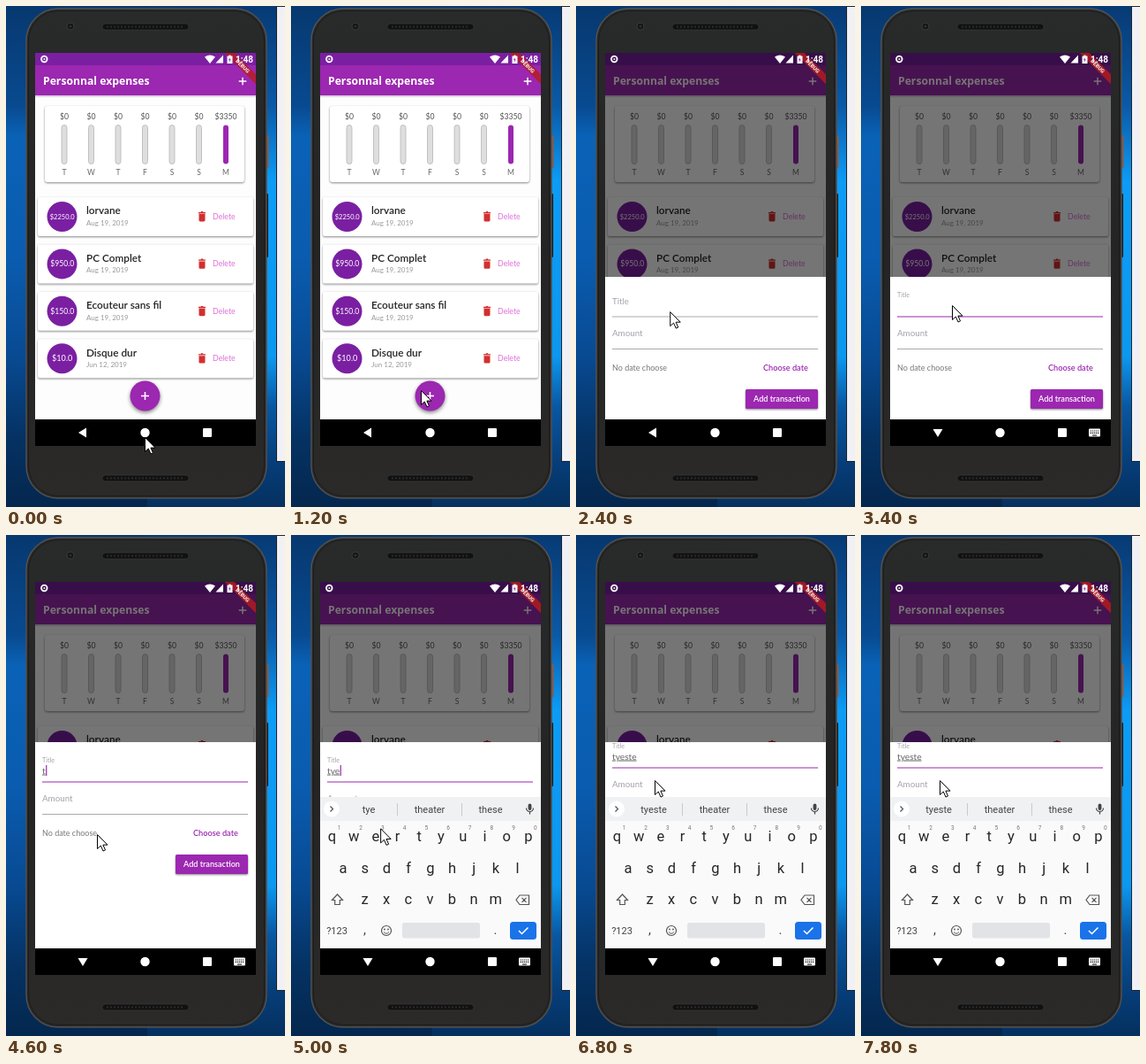
Animation, 316 px wide and 566 px high, one loop 8000 ms. Source, as an HTML page:

```html
<!DOCTYPE html>
<html lang="en">
<head>
<meta charset="utf-8">
<title>Expenses app</title>
<style>
html, body { margin: 0; width: 100%; height: 100%; overflow: hidden; }
svg { display: block; width: 316px; height: 566px; font-family: Lato, sans-serif; }
.mid { text-anchor: middle; }
.semi { font-weight: 600; }
.bold { font-weight: 700; }
.sys { font-family: Roboto, sans-serif; }
.bar { font: 700 12.2px "Open Sans", sans-serif; }
.card { fill: #fff; filter: drop-shadow(0 1.2px 1.3px #0007); }
</style>
</head>
<body>
<svg id="stage" viewBox="0 0 316 566"></svg>
<script>
const PURPLE = '#9c27b0', DARK = '#7b1fa2', HINT = '#a5a0aa';

const text = (x, y, size, str, fill, cls = '', extra = '') =>
  `<text x="${x}" y="${y}" font-size="${size}" fill="${fill}" class="${cls}" ${extra}>${str}</text>`;
const rect = (x, y, w, h, fill, r = 0, extra = '') =>
  `<rect x="${x}" y="${y}" width="${w}" height="${h}" rx="${r}" fill="${fill}" ${extra}/>`;
const circle = (x, y, r, fill, extra = '') =>
  `<circle cx="${x}" cy="${y}" r="${r}" fill="${fill}" ${extra}/>`;
const path = (d, fill, extra = '') => `<path d="${d}" fill="${fill}" ${extra}/>`;
const line = (d, stroke, width = 1, extra = '') =>
  path(d, 'none', `stroke="${stroke}" stroke-width="${width}" ${extra}`);
const group = (id, body, extra = '') => `<g id="${id}" ${extra}>${body}</g>`;
const gradient = (id, stops) => `<linearGradient id="${id}" x2="0" y2="1">` +
  stops.map(([at, c]) => `<stop offset="${at}" stop-color="${c}"/>`).join('') + '</linearGradient>';

const defs = `<defs>
  ${gradient('left', [[0, '#07386f'], [.2, '#084a90'], [.26, '#0a62b6'], [.5, '#0a5cb0'], [.7, '#084a92'], [.86, '#053263'], [1, '#04274e']])}
  ${gradient('right', [[0, '#073a74'], [.2, '#0a5aa8'], [.35, '#0c9cf6'], [.7, '#0c98f0'], [.8, '#0857a2'], [.92, '#063c76'], [1, '#05305f']])}
  ${gradient('body', [[0, '#292a2a'], [.5, '#242424'], [1, '#2b2a29']])}
  <clipPath id="screen">${rect(33, 53, 250, 414, '#fff')}</clipPath>
</defs>`;

const wallpaper = rect(0, 0, 160, 566, 'url(#left)') + rect(160, 0, 156, 566, 'url(#right)') +
  rect(306.5, .5, 20, 514, '#f1f0f5', 0, 'stroke="#1d2733"');

const speaker = y => rect(109, y, 98, 7, '#111', 3.5, 'stroke="#3a3a3a" stroke-width=".7"') +
  line(`M114 ${y + 3.5}H202`, '#2b2b2b', 2, 'stroke-dasharray="2 2"');

const phone = rect(294, 146, 3.5, 37, '#8a5b4a', 1) + rect(294, 212, 3, 72, '#1a1a1a', 1) +
  rect(23, 3, 272, 553, 'url(#body)', 36, 'stroke="#55524f" stroke-width="1.4"') +
  rect(25.5, 5.5, 267, 548, 'none', 34, 'stroke="#1c1c1c"') +
  circle(73, 23, 4, '#151515', 'stroke="#393939"') + circle(73, 23, 1.5, '#27303d') +
  speaker(20) + speaker(530);

const plus = (x, y, r) => line(`M${x - r} ${y}h${2 * r}M${x} ${y - r}v${2 * r}`, '#fff', 1.5);

const chart = rect(44, 113, 226, 86, '', 3, 'class="card"') + [...'TWTFSSM'].map((day, i) => {
  const x = 66 + i * 30.5, last = i === 6;
  return text(x, 128, 8.7, last ? '$3350' : '$0', '#555', 'mid') +
    rect(x - 3, 134.5, 6, 44, last ? PURPLE : '#dedede', 3, last ? '' : 'stroke="#b5b5b5" stroke-width=".8"') +
    text(x, 190.5, 8.5, day, '#666', 'mid');
}).join('');

const trash = (x, y) => path(`M${x - 4} ${y - 5}h2.3l.8-.9h1.8l.8.9h2.3v1.4h-8zM${x - 3.5} ${y - 3}h7v7q0 1.4-1.4 1.4h-4.2q-1.4 0-1.4-1.4z`, '#d32f2f');

const items = [
  ['$2250.0', 7.5, 'lorvane', 'Aug 19, 2019'],
  ['$950.0', 8.6, 'PC Complet', 'Aug 19, 2019'],
  ['$150.0', 8.6, 'Ecouteur sans fil', 'Aug 19, 2019'],
  ['$10.0', 9.1, 'Disque dur', 'Jun 12, 2019']
].map(([price, size, name, date], i) => {
  const y = 238 + i * 53.4;
  return rect(36, y - 22, 244, 44, '', 2, 'class="card"') +
    circle(63.5, y, 17, DARK) +
    text(63.7, y + 2.8, size, price, '#fff', 'mid') +
    text(91, y - 2.7, 11.8, name, '#222', 'semi') +
    text(91, y + 10, 8, date, '#999') +
    trash(222, y) + text(234, y + 3, 8.8, 'Delete', '#dd6fda');
}).join('');

const app = rect(33, 53, 250, 414, '#fdfdfd') + rect(33, 101, 250, 2, '#0002') +
  rect(33, 67, 250, 34, PURPLE) + rect(33, 53, 250, 14, DARK) +
  text(42, 88.5, 12.2, 'Personnal expenses', '#fff', 'bar') + plus(268, 85, 4.3) +
  chart + items +
  circle(157.5, 440.5, 17, PURPLE, 'style="filter:drop-shadow(0 2px 2px #0007)"') + plus(157.5, 440.5, 4.5);

const status = circle(43.3, 60, 3.3, 'none', 'stroke="#fff" stroke-width="1.8"') + circle(43.3, 60, 1, '#fff') +
  path('M225 57.5Q231 53.5 237 57.5L231 65zM246 55.5V64.5H237.5z', '#fff') +
  path('M250.5 56.5h2v-1h2v1h2v8.5h-6z', '#fff') + path('M254 58l-2 3h1.3l-.5 2.5 2-3h-1.3z', DARK) +
  text(260, 64, 10, '1:48', '#fff', 'sys bold');

const banner = group('banner', rect(-26, 17.2, 52, 7.8, '#b71c1c', 0, 'opacity=".8"') +
  text(0, 23.2, 6, 'DEBUG', '#fff', 'sys bold mid'), 'transform="translate(283 53) rotate(45)"');

const form = group('form',
  text(0, 0, 9.7, 'Title', HINT, '', 'id="label"') +
  text(41, 341.5, 10.2, '', '#666', '', 'id="typed" text-decoration="underline"') +
  rect(0, 332, 1.2, 12, PURPLE, 0, 'id="caret"') +
  line('M41 351H274', '#aaa', 1.1, 'id="rule"') +
  text(41, 372.5, 9.8, 'Amount', HINT) + line('M41 387.5H274', '#aaa') +
  text(41, 411.8, 9, 'No date choose', '#777') +
  text(212, 411.5, 9.2, 'Choose date', PURPLE, 'semi') +
  rect(192, 433, 82, 22, PURPLE, 1.5, 'style="filter:drop-shadow(0 1px 1px #0007)"') +
  text(233, 447.3, 9.1, 'Add transaction', '#fff', 'mid semi'));

const keyRow = (keys, x, y) => [...keys].map((k, i) => text(x + i * 24.7, y, 16.5, k, '#252629', 'sys mid')).join('');

const keyboard = rect(33, 296, 250, 171, '#fafafb') + rect(33, 296, 250, 27, '#eff1f3') +
  circle(46, 309.5, 9, '#fff') + line('M44.5 306.5l3 3-3 3', '#555', 1.3) +
  text(88, 313.5, 11, '', '#444', 'sys mid', 'id="hint"') +
  text(157, 313.5, 11, 'theater', '#444', 'sys mid') + text(226, 313.5, 11, 'these', '#444', 'sys mid') +
  line('M120.5 303v14M193.5 303v14', '#c8cacc') +
  rect(268.6, 303.5, 3.8, 7.5, '#444', 1.9) + line('M266.5 308.5a4 4 0 0 0 8 0M270.5 312.5v3', '#444', 1.2) +
  keyRow('qwertyuiop', 46.5, 346) + keyRow('asdfghjkl', 59, 381.5) + keyRow('zxcvbnm', 83.5, 417) +
  [...'1234567890'].map((n, i) => text(54.5 + i * 24.7, 333, 6.5, n, '#777', 'sys mid')).join('') +
  line('M52.5 406l-6 6.5h3.2v5h5.6v-5h3.2z', '#555', 1.2) +
  line('M259 407h10.5v10.5H259l-4-5.25zM261.5 409.8l5 5m0-5l-5 5', '#555', 1.2) +
  text(52, 451, 11, '?123', '#444', 'sys mid') + text(83.5, 451, 15, ',', '#444', 'sys mid') +
  circle(108, 447, 5.5, 'none', 'stroke="#555" stroke-width="1.2"') +
  circle(106, 445.5, .9, '#555') + circle(110, 445.5, .9, '#555') + line('M105 448.5q3 3.5 6 0', '#555') +
  rect(126, 438, 88, 17.5, '#e2e3e6', 2.5) + text(231.5, 451, 15, '.', '#444', 'sys mid') +
  rect(248, 437, 30, 20, '#1a73e8', 3.5) + line('M258 447l3.5 3.5 7-7', '#fff', 1.5);

const nav = rect(33, 467, 250, 30, '#000') +
  path('M82 482l9-5.5v11z', '#fff', 'id="back"') +
  circle(157.5, 482, 5.2, '#fff') + rect(223, 477, 10, 10, '#fff', 1) +
  group('ime', rect(258, 477.5, 13, 9, '#fff', 1) +
    line('M259.5 480h10M259.5 482.3h10', '#000', 1.2, 'stroke-dasharray="1.2 .9"') + line('M262 485h5', '#000'));

const $ = id => document.getElementById(id);
$('stage').innerHTML = defs + wallpaper + phone +
  group('view', app + rect(33, 53, 250, 414, '#000', 0, 'id="shade" opacity=".54"') + banner + status +
    group('sheet', rect(33, 306, 250, 260, '#fff') + form) + group('keys', keyboard),
    'clip-path="url(#screen)"') +
  nav + group('pointer', path('M0 0V16L3.8 12.5 6.5 18.5 9 17.4 6.4 11.6H11.5z', '#fff', 'stroke="#000"'));

const ease = u => u * u * (3 - 2 * u);
const ramp = (t, from, to) => ease(Math.min(1, Math.max(0, (t - from) / (to - from))));
const show = (id, on) => $(id).setAttribute('visibility', on ? 'visible' : 'hidden');
const move = (id, x, y, rest = '') => $(id).setAttribute('transform', `translate(${x} ${y}) ${rest}`);

// Pointer stops: x, y, start and end of the move that leads there
const stops = [[147.5, 434.5, 0, 1200], [103.5, 338.5, 1400, 2600], [85.5, 274.5, 4800, 5800], [89.5, 277.5, 6000, 6800]];

function draw(t) {
  let x = 157.5, y = 487.5;
  for (const [toX, toY, from, to] of stops) {
    const u = ramp(t, from, to);
    x += (toX - x) * u;
    y += (toY - y) * u;
  }
  move('pointer', x, y);

  const open = t >= 1400, focus = t >= 3200, typing = t >= 4600;
  show('shade', open);
  show('sheet', open);
  show('keys', t >= 4800);
  show('ime', focus);
  show('caret', typing && t < 6200);
  $('back').setAttribute('transform', focus ? 'rotate(-90 87 482)' : '');
  move('sheet', 0, typing ? -72 : 0);
  move('form', 0, -16 * ramp(t, 6000, 6800));

  const lift = ramp(t, 3000, 3400);
  move('label', 41, 336.5 - 7.5 * lift, `scale(${1 - .26 * lift})`);
  $('rule').setAttribute('stroke', focus ? PURPLE : '#aaa');

  const word = typing ? 'tyeste'.slice(0, 1 + Math.floor((t - 4600) / 200)) : '';
  $('typed').textContent = $('hint').textContent = word;
  $('caret').setAttribute('x', 41.5 + $('typed').getComputedTextLength());
}

// The picture advances in steps of 200 ms
function tick(now) {
  draw(Math.floor(now % 8000 / 200) * 200);
  requestAnimationFrame(tick);
}
draw(0);
requestAnimationFrame(tick);
</script>
</body>
</html>
```
